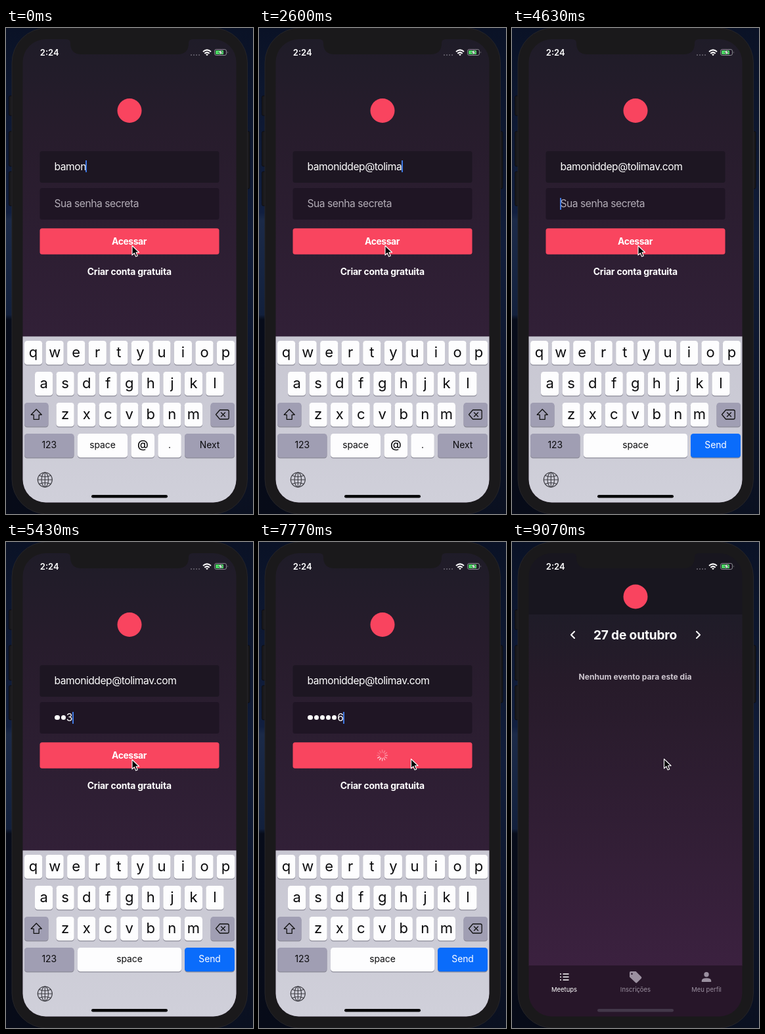
These frames come from a looping animation (376 by 738 pixels, 9110 ms). An HTML page:

```html
<!DOCTYPE html>
<html lang="pt-BR">
<head>
<meta charset="utf-8">
<title>Login</title>
<style>
  html, body { margin: 0; width: 100%; height: 100%; overflow: hidden; background: #0a1020; }
  #stage { position: relative; width: 376px; height: 738px; overflow: hidden; }
  svg { position: absolute; left: 0; top: 0; display: block; }
  svg text, .field { font-family: Inter, Roboto, "Liberation Sans", sans-serif; }
  .mid { text-anchor: middle; }
  .bold { font-weight: 700; fill: #fff; }
  .line { fill: none; stroke-linecap: round; stroke-linejoin: round; }
  .key { font-size: 22px; fill: #0b0b0d; }
  .word { font-size: 13.9px; fill: #0b0b0d; letter-spacing: -.1px; }
  .tab { font-size: 9.5px; fill: #9b90a0; }
  .field {
    position: absolute; left: 73.5px; height: 24px; display: flex; align-items: center;
    font-size: 15.6px; letter-spacing: -.45px; color: #fff; white-space: pre;
  }
  #email { top: 198px; }
  #pass { top: 254.5px; }
  .caret { width: 2px; height: 18px; margin: 0 -1.5px 0 -.5px; background: #3f78e0; }
  .dot { width: 7.4px; height: 7.4px; margin: 0 .9px; border-radius: 50%; background: #fff; }
  .hint { color: #b3adb7; }
</style>
</head>
<body>
<div id="stage">
<svg width="376" height="738" viewBox="0 0 376 738">
  <defs>
    <linearGradient id="wall" x1="0" y1="0" x2="0" y2="1">
      <stop offset="0" stop-color="#0a1226"/>
      <stop offset=".38" stop-color="#111f40"/>
      <stop offset=".395" stop-color="#1b2a48"/>
      <stop offset=".59" stop-color="#12203c"/>
      <stop offset=".6" stop-color="#070c1a"/>
      <stop offset="1" stop-color="#070b18"/>
    </linearGradient>
    <linearGradient id="wallRight" x1="0" y1="0" x2="0" y2="1">
      <stop offset="0" stop-color="#0a1226"/>
      <stop offset=".45" stop-color="#101c39"/>
      <stop offset="1" stop-color="#0a1020"/>
    </linearGradient>
    <linearGradient id="loginBg" gradientUnits="userSpaceOnUse" x1="0" y1="17" x2="0" y2="721">
      <stop offset="0" stop-color="#1f1c28"/>
      <stop offset=".2" stop-color="#271c2c"/>
      <stop offset="1" stop-color="#3a2340"/>
    </linearGradient>
    <linearGradient id="homeBg" gradientUnits="userSpaceOnUse" x1="0" y1="110" x2="0" y2="643">
      <stop offset="0" stop-color="#1f1c28"/>
      <stop offset=".2" stop-color="#271b2a"/>
      <stop offset="1" stop-color="#3b213f"/>
    </linearGradient>
    <linearGradient id="boardBg" x1="0" y1="0" x2="0" y2="1">
      <stop offset="0" stop-color="#c8c7d2"/>
      <stop offset="1" stop-color="#d0d0da"/>
    </linearGradient>
    <clipPath id="screen"><rect x="25.5" y="17" width="325" height="703.5" rx="35"/></clipPath>
  </defs>

  <rect width="188" height="738" fill="url(#wall)"/>
  <rect x="188" width="188" height="738" fill="url(#wallRight)"/>
  <g fill="#1a191c" stroke="#0c0c0f" stroke-width=".8">
    <rect x="4.5" y="103" width="8" height="30" rx="2"/>
    <rect x="4.5" y="157" width="8" height="53" rx="2"/>
    <rect x="4.5" y="218" width="8" height="52" rx="2"/>
    <rect x="363" y="157" width="8" height="87" rx="2"/>
  </g>
  <rect x="9" y="0" width="358.5" height="738" rx="53" fill="#1a191b" stroke="#252428"/>

  <g clip-path="url(#screen)">
    <g id="login">
      <rect x="25" y="17" width="326" height="704" fill="url(#loginBg)"/>
      <circle cx="188" cy="125.5" r="18.5" fill="#f9445f"/>
      <rect x="51.5" y="187" width="273" height="48" rx="3.5" fill="#1d1622"/>
      <rect x="51.5" y="243" width="273" height="48" rx="3.5" fill="#1f1524"/>
      <rect x="51.5" y="304.3" width="273" height="39.5" rx="3.5" fill="#f9455f"/>
      <text id="enter" class="mid bold" x="187.5" y="329" font-size="13.9" letter-spacing="-.4">Acessar</text>
      <g id="spinner" stroke="#fff" stroke-width="1.3" stroke-linecap="round"></g>
      <text class="mid bold" x="187.8" y="374.5" font-size="13.9" letter-spacing="-.18">Criar conta gratuita</text>
    </g>

    <g id="home">
      <rect x="25" y="17" width="326" height="94" fill="#18161f"/>
      <rect x="25" y="110" width="326" height="534" fill="url(#homeBg)"/>
      <circle cx="188" cy="83" r="18.5" fill="#f9445f"/>
      <path class="line" d="M95 136l-5 5 5 5M281 136l5 5-5 5" stroke="#fff" stroke-width="2"/>
      <text class="mid bold" x="187.5" y="148" font-size="19.1" letter-spacing="-.15">27 de outubro</text>
      <text class="mid bold" x="187.5" y="209" font-size="12.1" style="fill:#cdc6cf">Nenhum evento para este dia</text>
      <rect x="25" y="643" width="326" height="78" fill="#271629"/>
      <path d="M73 656h2m2.5 0h9M73 660.5h2m2.5 0h9M73 665h2m2.5 0h9" stroke="#fff" stroke-width="1.7"/>
      <path d="M179 654q0-2 2-2h7.5l8.3 8.3q1.2 1.2 0 2.4l-6.4 6.4q-1.2 1.2-2.4 0L179 660.5zM182.5 657a1.3 1.3 0 1 0 0-2.6 1.3 1.3 0 0 0 0 2.6z" fill="#9b90a0" fill-rule="evenodd"/>
      <path d="M296 660.5a3.7 3.7 0 1 0 0-7.4 3.7 3.7 0 0 0 0 7.4zM288.8 668v-2q0-3.8 7.2-3.8t7.2 3.8v2z" fill="#9b90a0"/>
      <text class="mid tab" x="79.5" y="683" style="fill:#fff">Meetups</text>
      <text class="mid tab" x="188" y="683">Inscrições</text>
      <text class="mid tab" x="296" y="683">Meu perfil</text>
    </g>

    <g id="board">
      <rect x="25" y="468.4" width="326" height="260" fill="url(#boardBg)"/>
      <g id="keys"></g>
      <g id="mailKeys"></g>
      <g id="passKeys"></g>
      <g class="line" stroke="#111" stroke-width="1.3">
        <path d="M46.2 579l8 8.3h-4v7h-8v-7h-4z"/>
        <path d="M319.5 587l6-7h11.5q2.2 0 2.2 2.2v9.6q0 2.2-2.2 2.2h-11.5zM327.5 584l6 6m0-6l-6 6"/>
      </g>
      <g class="line" stroke="#3a3a40" stroke-width="1.1">
        <circle cx="59.3" cy="686" r="11"/>
        <ellipse cx="59.3" cy="686" rx="5.2" ry="11"/>
        <path d="M59.3 675v22M48.3 686h22M50.6 679.5q8.7 4 17.4 0M50.6 692.5q8.7-4 17.4 0"/>
      </g>
    </g>
    <rect id="bar" x="130" y="709" width="116" height="4.5" rx="2.2"/>
  </g>

  <path d="M92 16h192v1q-6 0-6 6 0 17-17 17H115q-17 0-17-17 0-6-6-6z" fill="#1a191b"/>
  <text x="51.8" y="41.7" font-size="13" font-weight="600" fill="#fff">2:24</text>
  <path d="M282 41h.01m4 0h.01m4 0h.01m4 0h.01" class="line" stroke="#66626e" stroke-width="2.2"/>
  <g class="line" stroke="#fff" stroke-width="2" style="stroke-linecap:butt">
    <path d="M300 36q6-5.2 12 0M302.3 38.7q3.7-3.2 7.4 0"/>
  </g>
  <path d="M306 42.3l-2-2.2q2-1.4 4 0z" fill="#fff"/>
  <rect x="317.5" y="32.5" width="18" height="9" rx="2.6" fill="none" stroke="#8f8c96"/>
  <path d="M337.3 35.5q1.6 1.5 0 3z" fill="#8f8c96"/>
  <rect x="319" y="34" width="12" height="6" rx="1.3" fill="#4cd964"/>
  <path d="M328 32.8l-5 4.8h3l-1 3.6 5-4.8h-3z" fill="#fff" stroke="#1f1c28" stroke-width=".5"/>
  <path id="mouse" d="M0 0v15.5l3.6-3.4 2.5 5.7 2.8-1.2-2.5-5.6h5z" fill="#000" stroke="#fff" stroke-width="1.2" stroke-linejoin="round"/>
</svg>
<div id="fields">
  <div id="email" class="field"></div>
  <div id="pass" class="field"></div>
</div>
</div>
<script>
const LOOP = 9110, FOCUS = 4350, LOAD = 7200, HOME = 8530;
const MAIL = 'bamoniddep@tolimav.com', SECRET = '123456';
const START = 5; // letters already typed when the loop begins
const burst = (from, step, n) => Array.from({ length: n }, (_, i) => from + step * i);
const mailTimes = [...burst(220, 205, 5), ...burst(1500, 180, 12)];
const passTimes = [...burst(4750, 220, 3), ...burst(5720, 240, 3)];

const $ = id => document.getElementById(id);
const show = (id, on) => { $(id).style.display = on ? '' : 'none'; };
const clamp = v => Math.max(0, Math.min(1, v));
const ease = v => v * v * (3 - 2 * v);
const count = (times, t) => times.filter(k => k <= t).length;

function key(x, y, w, label = '', type = 'key', fill = '#fdfdfe', ink = '#0b0b0d') {
  const base = y + (type === 'key' ? 24.8 : 22.3);
  return `<rect x="${x}" y="${y + 1}" width="${w}" height="36.5" rx="4.3" fill="#8b8a97"/>
    <rect x="${x}" y="${y}" width="${w}" height="36.3" rx="4.3" fill="${fill}"/>
    <text class="mid ${type}" x="${x + w / 2}" y="${base}" style="fill:${ink}">${label}</text>`;
}

const GREY = '#a09eb3';
const rows = [['qwertyuiop', 28, 475], ['asdfghjkl', 44, 522], ['zxcvbnm', 76.5, 569]];
$('keys').innerHTML =
  rows.map(([letters, x, y]) => [...letters].map((c, i) => key(x + i * 32.55, y, 27.2, c)).join('')).join('') +
  key(28, 569, 36.5, '', 'word', GREY) + key(311.5, 569, 36.5, '', 'word', GREY) +
  key(28, 616, 75.5, '123', 'word', GREY);
$('mailKeys').innerHTML = key(109, 616, 76, 'space', 'word') +
  key(190.5, 616, 35.5, '<tspan font-size="17" font-weight="500">@</tspan>', 'word') +
  key(231.3, 616, 35.5, '.', 'word') + key(272, 616, 76, 'Next', 'word', GREY);
$('passKeys').innerHTML = key(109, 616, 158, 'space', 'word') +
  key(272, 616, 76, 'Send', 'word', '#0a6cfb', '#fff');
$('spinner').innerHTML = Array.from({ length: 12 }, (_, i) =>
  `<path d="M0-4.4V-8" transform="rotate(${i * 30})" opacity="${(0.2 + 0.65 * (i / 11) ** 1.5).toFixed(2)}"/>`).join('');

function caret(t, last) {
  const p = (t - last) % 1000;
  const alpha = p < 600 ? 1 : p < 700 ? (700 - p) / 100 : p < 900 ? 0 : (p - 900) / 100;
  return `<i class="caret" style="opacity:${alpha}"></i>`;
}

function drawFields(t) {
  const n = count(mailTimes, t), m = count(passTimes, t);
  const inPass = t >= FOCUS;
  $('email').innerHTML = `<span>${MAIL.slice(0, START + n)}</span>` +
    (inPass ? '' : caret(t, mailTimes[n - 1] || 0));
  const cursor = inPass ? caret(t, passTimes[m - 1] || FOCUS) : '';
  $('pass').innerHTML = m
    ? '<i class="dot"></i>'.repeat(m - 1) + `<span>${SECRET[m - 1]}</span>` + cursor
    : cursor + '<span class="hint">Sua senha secreta</span>';
}

function draw(t) {
  const home = t >= HOME, loading = t >= LOAD;
  show('login', !home);
  show('fields', !home);
  show('home', home);
  show('mailKeys', t < FOCUS);
  show('passKeys', t >= FOCUS);
  show('enter', !loading);
  show('spinner', loading);
  if (!home) drawFields(t);

  const turn = Math.floor(t / 83.3) % 12 * 30;
  $('spinner').setAttribute('transform', `translate(187.6 324) rotate(${turn})`);

  const drop = 1 - (1 - clamp((t - HOME) / 280)) ** 3;
  $('board').setAttribute('transform', `translate(0 ${drop * 255})`);
  $('bar').setAttribute('fill', drop > 0.9 ? '#43384a' : '#08080a');

  const move = ease(clamp((t - 7300) / 330));
  $('mouse').setAttribute('transform', `translate(${192 + move * 39.5} ${330.5 - move}) scale(.93)`);
}

function tick() {
  draw(performance.now() % LOOP);
  requestAnimationFrame(tick);
}
tick();
</script>
</body>
</html>
```
